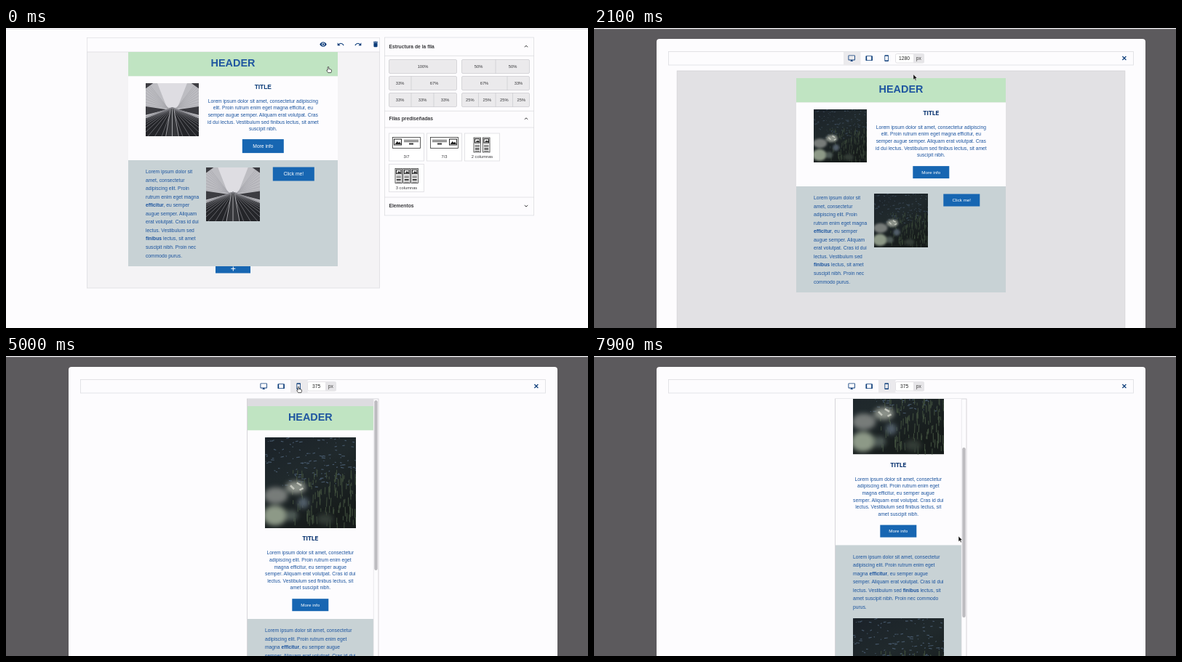
Write an HTML page that moves like this. It is 800 by 413 pixels and loops after 8 s.

```html
<!DOCTYPE html>
<html lang="es">
<head>
<meta charset="utf-8">
<title>Email editor preview</title>
<style>
  html, body { margin: 0; width: 100%; height: 100%; overflow: hidden; background: #fdfcfe; }
  svg { display: block; width: 800px; height: 413px; font-family: "Liberation Sans", Arial, sans-serif; }
</style>
</head>
<body>
<svg id="stage" viewBox="0 0 800 413"></svg>
<script>
const LOOP = 8000, STEP = 100;
const BLUE = '#1b549f', NAVY = '#0d3d7a', ACTION = '#1766b2', PAPER = '#fdfcfe';
const GREEN = '#c0e4c2', SLATE = '#c8d2d5';

// Drawing helpers
const attrs = o => Object.entries(o).map(([k, v]) => ` ${k}="${v}"`).join('');
const rect = (x, y, w, h, fill, extra = {}) =>
  `<rect${attrs({ x, y, width: w, height: h, fill, ...extra })}/>`;
const box = (x, y, w, h, fill, stroke = '#dddce0', extra = {}) =>
  rect(x + .5, y + .5, w - 1, h - 1, fill, { stroke, 'stroke-width': .8, ...extra });
const path = (d, extra = {}) => `<path${attrs({ d, ...extra })}/>`;
const line = (d, stroke = '#dddce0', width = .8) =>
  path(d, { fill: 'none', stroke, 'stroke-width': width });
// y is the vertical middle of the capitals
const text = (x, y, str, size = 6.72, fill = BLUE, extra = {}) =>
  `<text${attrs({ x, y: y + size * .36, 'font-size': size, fill, ...extra })}>${str}</text>`;
const MID = { 'text-anchor': 'middle' }, BOLD = { 'font-weight': 700 };
const centered = (x, y, str, size, fill, extra) => text(x, y, str, size, fill, { ...MID, ...extra });
const lines = (list, x, y, gap, extra) =>
  list.map((s, i) => text(x, y + i * gap, s, 6.72, BLUE, extra)).join('');
const group = (id, body, extra = {}) => `<g${attrs({ id, ...extra })}>${body}</g>`;
const strong = s => `<tspan font-weight="700">${s}</tspan>`;
const photo = (id, x, y, size) =>
  `<use${attrs({ href: '#' + id, x, y, width: size, height: size, class: id })}/>`;

function seeded(seed) {
  return () => (seed = (seed * 16807) % 2147483647) / 2147483647;
}

// Icons on a 24 unit grid, placed by their centre
const ICONS = {
  eye: 'M12 4.5C7 4.5 2.73 7.61 1 12c1.73 4.39 6 7.5 11 7.5s9.27-3.11 11-7.5c-1.73-4.39-6-7.5-11-7.5zM12 17a5 5 0 1 1 0-10 5 5 0 0 1 0 10zM12 9a3 3 0 1 0 0 6 3 3 0 0 0 0-6z',
  undo: 'M12.5 8c-2.65 0-5.05.99-6.9 2.6L2 7v9h9l-3.62-3.62c1.39-1.16 3.16-1.88 5.12-1.88 3.54 0 6.55 2.31 7.6 5.5l2.37-.78C21.08 11.03 17.15 8 12.5 8z',
  bin: 'M6 19c0 1.1.9 2 2 2h8c1.1 0 2-.9 2-2V7H6zM19 4h-3.5l-1-1h-5l-1 1H5v2h14z',
  desktop: 'M21 2H3a2 2 0 0 0-2 2v12a2 2 0 0 0 2 2h7v2H8v2h8v-2h-2v-2h7a2 2 0 0 0 2-2V4a2 2 0 0 0-2-2zM21 16H3V4h18z',
  tablet: 'M21 4H3a2 2 0 0 0-2 2v12a2 2 0 0 0 2 2h18a2 2 0 0 0 2-2V6a2 2 0 0 0-2-2zM19 18H5V6h14z',
  phone: 'M17 1H7a2 2 0 0 0-2 2v18a2 2 0 0 0 2 2h10a2 2 0 0 0 2-2V3a2 2 0 0 0-2-2zM17 19H7V5h10z'
};
const icon = (name, x, y, scale = .43, flip = 1) => path(ICONS[name], {
  fill: NAVY, 'fill-rule': 'evenodd',
  transform: `translate(${x} ${y}) scale(${scale * flip} ${scale}) translate(-12 -12)`
});

// Pictures
function towers() {
  let rays = '';
  for (let x = -150; x <= 250; x += 16) rays += `M50 46L${x} 112`;
  let walls = '';
  for (let y = -6; y < 46; y += 6) walls += `M0 ${y}L42 47M100 ${y}L58 47`;
  return rect(0, 0, 100, 100, '#bdbdc2') +
    path('M22 0H78L60 46H40z', { fill: '#dedde2' }) +
    line(walls, '#a2a2a8', .8) +
    path('M0 0H14L0 10zM100 0H86L100 10zM0 44L42 50 0 62zM100 44L58 50 100 62z', { fill: '#3c3c41' }) +
    path('M0 66L43 49H57L100 66V100H0z', { fill: '#242529' }) +
    path('M0 66L43 49 0 60zM100 66L57 49 100 60z', { fill: '#d0d0d4' }) +
    line(rays, '#85868b', .9) +
    path('M46 48H54L60 100H40z', { fill: '#36373b' }) +
    line('M47 48L38 100M53 48L62 100M50 48V100', '#b5b5ba', 1.2);
}

function forest() {
  const rnd = seeded(71);
  let specks = '', grass = '';
  for (let i = 0; i < 130; i++) {
    specks += `M${(rnd() * 100).toFixed(1)} ${(rnd() * 56).toFixed(1)}l${(rnd() * 4).toFixed(1)} ${(rnd() * 2 - 1).toFixed(1)}`;
    grass += `M${(30 + rnd() * 70).toFixed(1)} ${(35 + rnd() * 60).toFixed(1)}l${(rnd() - .5).toFixed(1)} ${(3 + rnd() * 8).toFixed(1)}`;
  }
  const petal = (cx, cy, rx, ry, fill) => `<ellipse${attrs({ cx, cy, rx, ry, fill })}/>`;
  return rect(0, 0, 100, 100, 'url(#dusk)') +
    line(specks, '#46586b', .9) + line(grass, '#3c4a3a', .9) +
    `<g filter="url(#soft)">` +
    petal(12, 64, 13, 9, '#777b79') + petal(34, 55, 11, 7, '#8b9189') +
    petal(11, 86, 13, 11, '#8d9987') + petal(42, 72, 6, 6, '#515d69') +
    petal(29, 86, 7, 6, '#4d5954') + petal(66, 90, 9, 6, '#303a36') + '</g>' +
    line('M28 53l4 4M35 50l5 3M38 58l4-2', '#c2c5bc', 2);
}

const DEFS = `<defs>
  <linearGradient id="dusk" x2=".5" y2="1"><stop stop-color="#1b2229"/><stop offset=".45" stop-color="#20292c"/><stop offset="1" stop-color="#161b1a"/></linearGradient>
  <filter id="soft"><feGaussianBlur stdDeviation="2.5"/></filter>
  <clipPath id="phoneClip"><rect x="332" y="59" width="173" height="354"/></clipPath>
  <symbol id="towers" viewBox="0 0 100 100">${towers()}</symbol>
  <symbol id="forest" viewBox="0 0 100 100">${forest()}</symbol></defs>`;

// Email contents
const INTRO = ['Lorem ipsum dolor sit amet, consectetur adipiscing', 'elit. Proin rutrum enim eget magna efficitur, eu',
  'semper augue semper. Aliquam erat volutpat. Cras', 'id dui lectus. Vestibulum sed finibus lectus, sit amet', 'suscipit nibh.'];
const INTRO_WIDE = ['Lorem ipsum dolor sit amet, consectetur adipiscing', 'elit. Proin rutrum enim eget magna efficitur, eu',
  'semper augue semper. Aliquam erat volutpat. Cras', 'id dui lectus. Vestibulum sed finibus lectus, sit amet', 'suscipit nibh.'];
const INTRO_PHONE = ['Lorem ipsum dolor sit amet, consectetur', 'adipiscing elit. Proin rutrum enim eget',
  'magna efficitur, eu semper augue', 'semper. Aliquam erat volutpat. Cras id dui', 'lectus. Vestibulum sed finibus lectus, sit', 'amet suscipit nibh.'];
const COLUMN = ['Lorem ipsum dolor sit', 'amet, consectetur', 'adipiscing elit. Proin', 'rutrum enim eget magna',
  strong('efficitur') + ', eu semper', 'augue semper. Aliquam', 'erat volutpat. Cras id dui', 'lectus. Vestibulum sed',
  strong('finibus') + ' lectus, sit amet', 'suscipit nibh. Proin nec', 'commodo purus.'];
const COLUMN_PHONE = ['Lorem ipsum dolor sit amet, consectetur', 'adipiscing elit. Proin rutrum enim eget',
  `magna ${strong('efficitur')}, eu semper augue`, 'semper. Aliquam erat volutpat. Cras id dui',
  `lectus. Vestibulum sed ${strong('finibus')} lectus, sit`, 'amet suscipit nibh. Proin nec commodo', 'purus.'];

const button = (cx, cy, w, h, label, size) =>
  rect(cx - w / 2, cy - h / 2, w, h, ACTION) + centered(cx, cy, label, size, '#fff');
const header = (cx, cy) => centered(cx, cy, 'HEADER', 14.4, '#1f56a0', BOLD);
const previewTitle = (x, y) => centered(x, y, 'TITLE', 7.9, '#123a75',
  { 'font-weight': 800, 'font-family': 'Inter, sans-serif' });

function wideEmail(x, y, image, preview) {
  const [bw, bh, size] = preview ? [50, 17, 6.24] : [57, 19, 6.72];
  return `<g transform="translate(${x} ${y})">` +
    rect(0, 0, 288, 33.5, GREEN) + header(144, 15.2) +
    rect(0, 33.5, 288, 115.5, PAPER) + photo(image, 24, 43, 73) +
    (preview ? previewTitle(185.3, 47.8) : centered(185.3, 47.5, 'TITLE', 8.4, NAVY, BOLD)) +
    lines(preview ? INTRO_WIDE : INTRO, 185.3, 67.2, 9.65, MID) +
    button(185.3, 129.6, bw, bh, 'More info', size) +
    rect(0, 149, 288, 146, SLATE) + lines(COLUMN, 24, 164.6, 11.55) +
    photo(image, 107, 159, 74) + button(227.3, 168, bw, bh, 'Click me!', size) + '</g>';
}

function phoneEmail() {
  return rect(332, 59, 173, 10, '#dddce0') + rect(332, 69, 173, 33.5, GREEN) + header(418.3, 84.2) +
    rect(332, 102.5, 173, 259.5, PAPER) + photo('forest', 356, 112, 125) +
    previewTitle(418.3, 251.4) + lines(INTRO_PHONE, 418.3, 271, 9.6, MID) +
    button(418.3, 342.7, 50, 17, 'More info', 6.24) +
    rect(332, 362, 173, 300, SLATE) + lines(COLUMN_PHONE, 356, 377.8, 11.55) +
    photo('forest', 356, 462.5, 125);
}

// Side panel
const INK = '#38383b';
const label = (x, y, s) => centered(x, y, s, 5.76, INK);
const heading = (y, s, dir) => text(526.5, y, s, 6.72, INK, BOLD) +
  line(`M712.8 ${y + dir}l2.2 ${-2 * dir} 2.2 ${2 * dir}`, INK, 1);

function splitRow(x, y, parts) {
  const width = 94;
  let at = x, out = box(x, y, width, 20, '#ebeaec', '#cfced2', { rx: 1.5 });
  parts.forEach((p, i) => {
    const w = width * p / 100;
    if (i) out += line(`M${at} ${y}v20`, '#cfced2');
    out += label(at + w / 2, y + 10, p + '%');
    at += w;
  });
  return out;
}
const thumb = (x, y, w, h) => rect(x, y, w, h, '#fff', { stroke: '#222', 'stroke-width': 1 }) +
  path(`M${x + 1} ${y + h - 1}l${w * .32} ${-h * .5} ${w * .2} ${h * .25} ${w * .15} ${-h * .2} ${w * .18} ${h * .45}z`, { fill: '#222' });
const strokes = (x, y, w) => line(`M${x} ${y}h${w}M${x} ${y + 2}h${w}`, '#333', .9) +
  rect(x + w / 2 - 3, y + 4, 6, 2, '#333');
const stack = (x, y) => box(x, y, 10.5, 21, '#fff', '#333') + thumb(x + 2, y + 2.2, 6.5, 5.5) +
  strokes(x + 2, y + 11, 6.5) + line(`M${x + 2} ${y + 19}h6.5`, '#333', .8);
const card = (x, y, name, body) => box(x, y, 49, 39, '#fff') + body + label(x + 24.5, y + 32.5, name);

const sidePanel = box(520, 12.5, 206, 246, PAPER) +
  line('M520 38.3H726M520 114.3H726M520 137H726M520 233H726') +
  heading(25.3, 'Estructura de la fila', 1) + heading(124.8, 'Filas prediseñadas', 1) + heading(245, 'Elementos', -1) +
  splitRow(526, 43, [100]) + splitRow(626, 43, [50, 50]) +
  splitRow(526, 66, [33, 67]) + splitRow(626, 66, [67, 33]) +
  splitRow(526, 89, [33, 33, 33]) + splitRow(626, 89, [25, 25, 25, 25]) +
  card(526, 144.5, '3/7', box(531, 150, 39, 16, '#fff', '#333') + thumb(533.5, 153, 10, 8) + strokes(547, 154.5, 20)) +
  card(578, 144.5, '7/3', box(583, 150, 39, 16, '#fff', '#333') + thumb(609.5, 153, 10, 8) + strokes(586, 154.5, 20)) +
  card(630, 144.5, '2 columnas', stack(642.5, 150.5) + stack(655, 150.5)) +
  card(526, 187, '3 columnas', stack(534.5, 193) + stack(545.5, 193) + stack(556.5, 193));

const editor = line('M0 1.3H800', '#e0dfe3', 1.2) + box(111, 13, 403, 345.5, '#f4f3f5') +
  rect(111.8, 13.8, 401.4, 19, PAPER) + line('M111 33H514') +
  icon('eye', 436, 22.5) + icon('undo', 460, 22.5) + icon('undo', 484, 22.5, .43, -1) + icon('bin', 508, 22.3) +
  rect(288, 326, 48, 11.5, ACTION) + wideEmail(168, 33, 'towers', false) +
  line('M309.3 331.3h6M312.3 328.5v6', '#fff', 1) + sidePanel +
  group('tooltip', rect(417, 38, 38, 14.5, ACTION, { rx: 1.5 }) + centered(436, 45.3, 'Preview', 6.7, '#fff'));

const modal = rect(86, 15, 672, 420, PAPER, { rx: 4 }) + box(102, 32, 640, 19.5, PAPER) +
  rect(0, 32.8, 23.5, 18, '#ebeaed', { id: 'active' }) + rect(0, 32.8, 23.5, 18, '#ebeaed', { id: 'hover' }) +
  icon('desktop', 354.2, 41.8) + icon('tablet', 378.2, 41.6) + icon('phone', 402.2, 41.6, .4) +
  box(414, 35, 40, 13.5, '#fff', '#dddce0', { rx: 2 }) + rect(439, 35.5, 14.7, 12.7, '#e6e5e8', { rx: 1 }) +
  centered(426.6, 41.8, '', 6.72, '#222', { id: 'width' }) + centered(446.2, 41.6, 'px', 6.72, '#444') +
  line('M726.4 39l5 5M731.4 39l-5 5', NAVY, 1.2) +
  group('wide', rect(0, 59, 0, 380, '#e2e1e4', { id: 'canvas', stroke: '#d2d1d5', 'stroke-width': .8 }) + wideEmail(278, 69, 'forest', true)) +
  group('narrow', box(331, 58.5, 181.5, 380, PAPER, '#cccbd0') +
    `<g clip-path="url(#phoneClip)">${group('scroller', phoneEmail())}</g>` +
    line('M505.3 59V413', '#e6e5e8') + rect(506.3, 61, 4.4, 234, '#bdbcc0', { rx: 2.2, id: 'thumb' }));

const OUTLINE = { fill: '#fff', stroke: '#222', 'stroke-width': .7, 'stroke-linejoin': 'round' };
const cursors = group('arrow', path('M0 0V7.6L1.8 6 3 8.8 4.3 8.2 3.1 5.6H5.4z', { fill: '#111', stroke: '#fff', 'stroke-width': .5 })) +
  group('hand', path('M-.8 .8Q0-.4.8.8V3.4L4 4.2Q4.8 4.6 4.5 6L3.8 8.5H-.3L-2.4 5.4Q-2.4 4.3-.8 5.2z', OUTLINE)) +
  group('beam', line('M-1.5-3.8Q0-3.8 0-3Q0-3.8 1.5-3.8M0-3V3M-1.5 3.8Q0 3.8 0 3Q0 3.8 1.5 3.8', '#222', .8));

document.getElementById('stage').innerHTML = DEFS + rect(0, 0, 800, 413, PAPER) + editor +
  rect(0, 1.3, 800, 412, '#5c5a5d', { id: 'backdrop' }) + group('modal', modal) + group('cursor', cursors);

// Motion
const $ = id => document.getElementById(id);
const set = (id, name, value) => $(id).setAttribute(name, value);
const show = (id, on) => set(id, 'display', on ? 'inline' : 'none');
const ramp = (t, a, b) => Math.min(1, Math.max(0, (t - a) / (b - a)));
const smooth = k => k * k * (3 - 2 * k);

function track(keys, t, ease = k => k) {
  let i = keys.length - 1;
  while (i > 0 && keys[i][0] > t) i--;
  const a = keys[i], b = keys[i + 1] || a;
  const k = a === b ? 0 : ease(ramp(t, a[0], b[0]));
  return a.slice(1).map((v, n) => typeof v === 'number' ? v + (b[n + 1] - v) * k : v);
}

const POINTER = [
  [0, 443, 53, 'hand'], [200, 443, 53, 'hand'], [700, 438, 23, 'hand'], [1200, 440, 24.5, 'arrow'],
  [1700, 440, 24.5, 'arrow'], [2000, 440, 60, 'arrow'], [2600, 425, 110, 'arrow'], [3100, 379, 42, 'hand'],
  [4400, 379, 42, 'hand'], [4700, 402, 42, 'hand'], [5500, 402, 42, 'arrow'], [5900, 404, 236.5, 'arrow'],
  [6300, 404, 236.5, 'beam'], [6500, 408, 240, 'beam'], [7300, 408, 240, 'arrow'], [7700, 501, 248, 'arrow']
];
const SCROLL = [[0, 0], [6000, 0], [6200, 9.6], [7200, 73.8], [7600, 101.6]];

function draw(t) {
  show('tooltip', t >= 700);
  set('backdrop', 'opacity', ramp(t, 1000, 1200));
  set('modal', 'opacity', ramp(t, 1180, 1480));
  document.querySelectorAll('#modal .forest').forEach(el =>
    el.setAttribute('display', t >= 2000 ? 'inline' : 'none'));

  const mode = t < 3800 ? 0 : t < 4800 ? 1 : 2;
  const width = [1280, 768, 375][mode], shown = width * .481;
  $('width').textContent = width;
  set('canvas', 'x', 422 - shown / 2);
  set('canvas', 'width', shown);
  show('wide', mode < 2);
  show('narrow', mode === 2);

  const [x, y, kind] = track(POINTER, t, smooth);
  set('active', 'x', 343 + mode * 24);
  set('hover', 'x', x < 390 ? 366.5 : 391);
  show('hover', t > 2000 && y < 50 && x < 414);

  const [scroll] = track(SCROLL, t);
  set('scroller', 'transform', `translate(0 ${-scroll})`);
  set('thumb', 'y', 61 + scroll * .64);

  set('cursor', 'transform', `translate(${x} ${y})`);
  for (const id of ['arrow', 'hand', 'beam']) show(id, id === kind);
}

const start = performance.now();
function tick() {
  const t = (performance.now() - start) % LOOP;
  draw(Math.floor(t / STEP) * STEP);
  requestAnimationFrame(tick);
}
tick();
</script>
</body>
</html>
```
